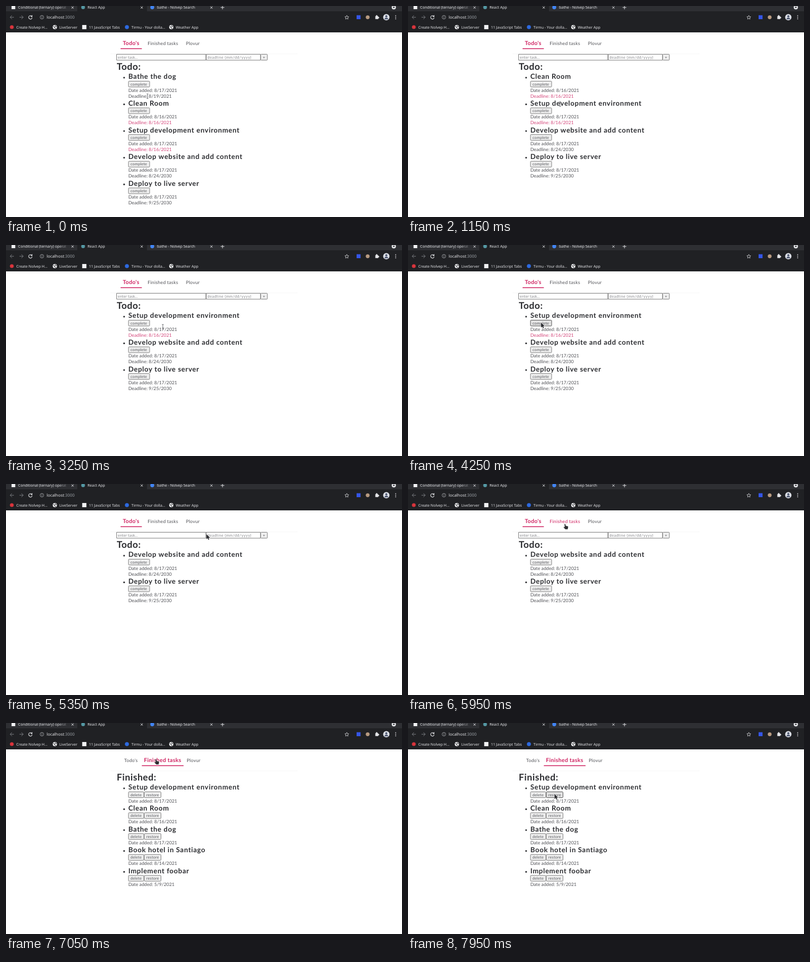
Write an HTML page with a canvas that moves like this. It is 750x400 px and loops after 8000 ms.

```html
<!DOCTYPE html>
<html lang="en">
<head>
<meta charset="utf-8">
<title>Todo app</title>
<style>
html, body { margin: 0; width: 100%; height: 100%; overflow: hidden; background: #fff; }
canvas { display: block; }
</style>
</head>
<body>
<canvas id="stage" width="750" height="400"></canvas>
<script>
const ctx = document.getElementById('stage').getContext('2d');
const LOOP = 8000;
const PINK = '#cf2361', SOFT_PINK = '#d4477b', INK = '#2b2c30', BODY = '#515257';
const FRAME = '#2e2f33', BAR = '#202124', LIGHT = '#e4e5e8', DIM = '#7b7d82';
const LATO = 'Lato, sans-serif', NOTO = '"Noto Sans", sans-serif';
const FINISHED_AT = 6650;

const todos = [
  { title: 'Bathe the dog', added: '8/17/2021', due: '8/19/2021', doneAt: 500 },
  { title: 'Clean Room', added: '8/16/2021', due: '8/16/2021', late: true, doneAt: 2900 },
  { title: 'Setup development environment', added: '8/17/2021', due: '8/16/2021', late: true, doneAt: 4900 },
  { title: 'Develop website and add content', added: '8/17/2021', due: '8/24/2030' },
  { title: 'Deploy to live server', added: '8/17/2021', due: '9/25/2030' }
];
const finished = [
  ...todos.slice(0, 3).reverse(),
  { title: 'Book hotel in Santiago', added: '8/14/2021' },
  { title: 'Implement foobar', added: '5/9/2021' }
];

// Pointer stops: time, x, y
const stops = [
  [0, 268, 171], [50, 268, 171], [350, 252, 147], [900, 252, 147],
  [1150, 288, 186], [1400, 420, 236], [1550, 345, 262], [1700, 278, 228],
  [1950, 256, 134], [2200, 252, 147], [2950, 252, 147], [3250, 297, 155],
  [3650, 424, 212], [3900, 350, 185], [4200, 252, 147], [4950, 252, 147],
  [5350, 379.5, 95], [5700, 317, 84], [6100, 287, 72], [6450, 283, 68.5],
  [7250, 283, 68.5], [7500, 312, 92], [7850, 277.5, 134.5], [8000, 277.5, 134.5]
];

let pointer, hits;

function pointerAt(t) {
  const i = stops.findIndex(s => s[0] > t);
  const [t0, x0, y0] = stops[i - 1], [t1, x1, y1] = stops[i];
  const u = (t - t0) / (t1 - t0), k = u * u * (3 - 2 * u);
  return { x: x0 + (x1 - x0) * k, y: y0 + (y1 - y0) * k };
}

const inside = (x, y, w, h) =>
  pointer.x >= x && pointer.x <= x + w && pointer.y >= y && pointer.y <= y + h;

function rect(x, y, w, h, color) {
  ctx.fillStyle = color;
  ctx.fillRect(x, y, w, h);
}

function disc(x, y, r, color) {
  ctx.fillStyle = color;
  ctx.beginPath();
  ctx.arc(x, y, r, 0, 2 * Math.PI);
  ctx.fill();
}

function stroke(path, color, width = 1) {
  ctx.strokeStyle = color;
  ctx.lineWidth = width;
  ctx.stroke(new Path2D(path));
}

function box(x, y, w, h, fill, border, r = 0) {
  ctx.beginPath();
  ctx.roundRect(x, y, w, h, r);
  ctx.fillStyle = fill;
  ctx.fill();
  ctx.strokeStyle = border;
  ctx.lineWidth = 1;
  ctx.stroke();
}

function text(str, x, y, size, { weight = 400, color = BODY, spacing = 0, family = LATO, cursor } = {}) {
  ctx.font = `${weight} ${size}px ${family}`;
  ctx.letterSpacing = `${spacing * size}px`;
  ctx.fillStyle = color;
  ctx.fillText(str, x, y);
  if (cursor && inside(x, y - size, ctx.measureText(str).width, size * 1.25)) hits.push(cursor);
}

const ui = (str, x, y, size = 7, color = LIGHT) => text(str, x, y, size, { color, family: NOTO });

function closeMark(x) {
  stroke(`M${x - 2} .8l4.2 4.2m0-4.2l-4.2 4.2`, LIGHT, 0.9);
}

function globe(x, y) {
  disc(x, y, 4, '#f1f2f4');
  stroke(`M${x - 3} ${y - 1.2}q2 .2 2.6 1.7t2 2.4M${x + 0.5} ${y - 3}q0 1.6 2.8 2`, BAR, 1.1);
}

function drawBrowser() {
  rect(0, 0, 750, 50, BAR);
  rect(0, 0, 135, 10, FRAME);
  rect(267, 0, 483, 10, FRAME);

  rect(10.5, 0, 7, 6, '#f1f2f4');
  const fade = ctx.createLinearGradient(100, 0, 119, 0);
  fade.addColorStop(0, LIGHT);
  fade.addColorStop(1, FRAME);
  ui('Conditional (ternary) operat', 23, 5, 7, fade);
  disc(146, 2.5, 3.5, '#5497a3');
  ui('React App', 154.5, 5);
  disc(277, 2.5, 3.7, '#4285f4');
  ui('bathe - Nolvep Search', 286, 5);
  [126, 257, 389].forEach(closeMark);
  stroke('M406.5 2.8h7M410 0v6.3', LIGHT, 1);
  disc(734.5, 2.5, 4, LIGHT);
  ctx.fillStyle = BAR;
  ctx.fill(new Path2D('M732.3 1.6h4.4l-2.2 2.6z'));

  stroke('M15 21.3H8M11.3 17.8L7.8 21.3l3.5 3.5', DIM, 1);
  stroke('M25.5 21.3h7M29.2 17.8l3.5 3.5-3.5 3.5', DIM, 1);
  stroke('M48.6 19.2a3.3 3.3 0 1 0 .9 2.9M49.4 17.4v2.7h-2.8', LIGHT, 1.1);

  stroke('M71.4 21.3a3.4 3.4 0 1 0-6.8 0a3.4 3.4 0 1 0 6.8 0M68 20.8v2.2M68 19.1v.9', '#b4b6ba', 0.8);
  ui('localhost', 77, 24, 7.8);
  ui(':3000', 77 + ctx.measureText('localhost').width, 24, 7.8, '#9aa0a6');
  stroke('M645.5 17.8l1.1 2.4 2.6.3-1.9 1.8.5 2.6-2.3-1.3-2.3 1.3.5-2.6-1.9-1.8 2.6-.3z', LIGHT, 0.8);

  rect(664, 17.5, 7.5, 7.5, '#3556e8');
  disc(685, 21.3, 3.6, '#b79a80');
  rect(699.5, 19.3, 5.5, 5.5, LIGHT);
  disc(702, 18.8, 1.5, LIGHT);
  disc(705.3, 22, 1.5, LIGHT);
  disc(720.3, 21.3, 6, '#dcdfe6');
  disc(720.3, 19.6, 2, '#4c5670');
  ctx.beginPath();
  ctx.arc(720.3, 25.3, 3.4, Math.PI, 0);
  ctx.fill();
  [18.3, 21.3, 24.3].forEach(y => disc(738, y, 0.9, LIGHT));

  disc(11, 40, 3.6, '#d8343c');
  ui('Create Nolvep H...', 19.5, 42.5);
  globe(92.5, 40);
  ui('LiveServer', 101, 42.5);
  rect(144.3, 36, 8, 8, '#f1f2f4');
  ui('11 JavaScript Tabs', 157, 42.5);
  disc(229, 40, 3.8, '#2d6ae0');
  ui('Tirmu - Your dolla...', 237.5, 42.5);
  globe(313, 40);
  ui('Weather App', 321.5, 42.5);
}

function navLink(str, x, active) {
  const width = active ? 71 : 57;
  const hover = str === 'Finished tasks' && inside(x, 63, width, 13);
  if (hover) hits.push('hand');
  text(str, x, active ? 73.8 : 73.6, active ? 10.54 : 8.78, {
    weight: active ? 700 : 400, color: active || hover ? PINK : BODY, spacing: 0.03
  });
}

function button(str, x, y, w) {
  const hover = inside(x, y, w, 11);
  if (hover) hits.push('arrow');
  box(x + 0.5, y + 0.5, w - 1, 11, hover ? '#e3e3e3' : '#efefef', hover ? '#505050' : '#7c7c7c', 1.2);
  text(str, x + 4.2, y + 8.6, 7.32, { spacing: 0.03 });
}

const heading = (str, y) =>
  text(str, 209.8, y, 17.57, { weight: 700, color: INK, spacing: 0.03, cursor: 'beam' });

function itemTitle(str, y) {
  disc(223.7, y - 2.6, 1.6, INK);
  text(str, 231.7, y, 13.18, { weight: 700, color: INK, spacing: 0.05, cursor: 'beam' });
}

const detail = (str, y, color) =>
  text(str, 231.7, y, 8.78, { color, cursor: 'beam' });

function field(x, w, hint, spacing) {
  box(x, 91.5, w, 11.2, '#fff', '#7c7c7c');
  text(hint, x + 2.2, 99.8, 7.32, { color: '#85868a', spacing });
  if (inside(x + 3, 93, w - 6, 9)) hits.push('beam');
}

const underline = (x, w) => rect(x, 80.1, w, 1.5, PINK);

function drawTodos(t) {
  navLink("Todo's", 221.2, true);
  navLink('Finished tasks', 268.2, false);
  navLink('Plovur', 340.7, false);
  underline(217, 40.3);

  field(209.5, 169, 'enter task...', 0.01);
  field(379.2, 102.8, 'deadline (mm/dd/yyyy)', 0.06);
  box(482.4, 91.5, 12.6, 11.2, '#efefef', '#7c7c7c', 1.2);
  text('+', 486.5, 99.8, 7.32);

  heading('Todo:', 120.9);
  todos.filter(task => !(t >= task.doneAt)).forEach((task, i) => {
    const y = 138.4 + i * 50.6;
    itemTitle(task.title, y);
    button('complete', 231.5, y + 3.6, 41);
    detail('Date added: ' + task.added, y + 24.2);
    detail('Deadline: ' + task.due, y + 35.2, task.late ? SOFT_PINK : BODY);
  });
}

function drawFinished() {
  navLink("Todo's", 223.8, false);
  navLink('Finished tasks', 261.3, true);
  navLink('Plovur', 342.2, false);
  underline(257.3, 79);

  heading('Finished:', 108.8);
  finished.forEach((task, i) => {
    const y = 126.4 + i * 39.6;
    itemTitle(task.title, y);
    button('delete', 231.5, y + 3.6, 30);
    button('restore', 261.5, y + 3.6, 32.5);
    detail('Date added: ' + task.added, y + 24.2);
  });
}

const shapes = {
  arrow: 'M0 0V9.4L2.2 7.5 3.7 10.8 5.3 10.1 3.9 6.9H6.8Z',
  hand: 'M0 .5Q1 -.6 1.7 .6L2.2 3.6 6.2 4.4Q7 4.8 6.8 6L6 10H1.6L-1.6 6.4Q-1.5 5.3 .6 6.1Z'
};

function drawPointer(kind) {
  ctx.save();
  ctx.translate(pointer.x, pointer.y);
  if (kind === 'beam') {
    stroke('M-1.7 -4.3H1.7M0 -4.3V4.3M-1.7 4.3H1.7', '#66676b', 0.9);
  } else {
    stroke(shapes[kind], '#e8e8e8', 1.2);
    ctx.fillStyle = '#2c2d31';
    ctx.fill(new Path2D(shapes[kind]));
  }
  ctx.restore();
}

function draw(now) {
  const t = now % LOOP;
  pointer = pointerAt(t);
  hits = [];
  rect(0, 0, 750, 400, '#fff');
  ctx.textRendering = 'geometricPrecision';
  drawBrowser();
  rect(198, 90.5, 354, 0.8, '#f3f3f4');
  if (t < FINISHED_AT) drawTodos(t);
  else drawFinished();
  drawPointer(hits[0] || 'arrow');
  requestAnimationFrame(draw);
}
requestAnimationFrame(draw);
</script>
</body>
</html>
```
